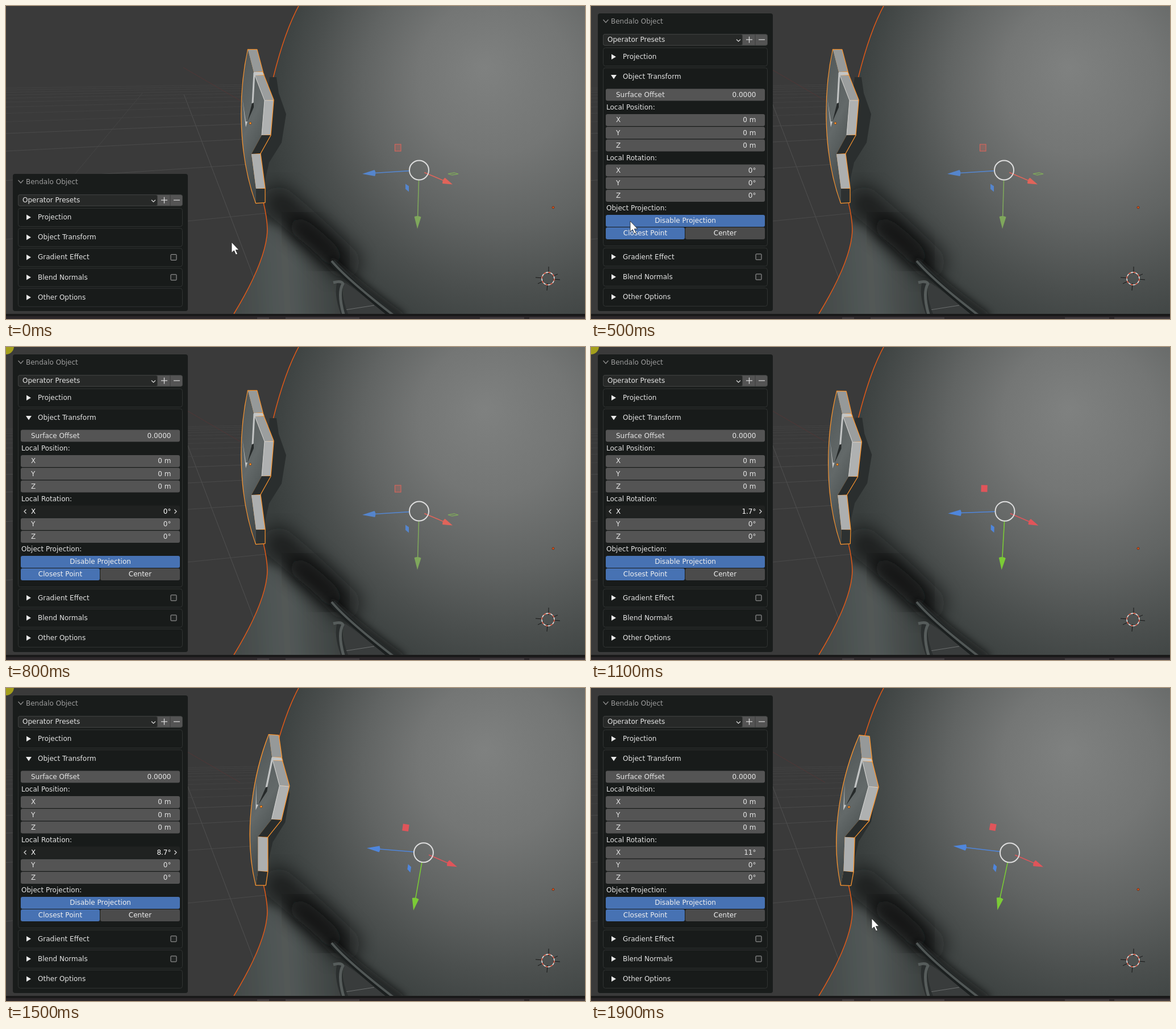
Recreate the animation shown at these times as an HTML page. Size 1019 px wide and 550 px high, loop 2000 ms.

```html
<!DOCTYPE html>
<html>
<head>
<meta charset="utf-8">
<style>
html, body { margin: 0; width: 100%; height: 100%; overflow: hidden; background: #1b1b1b; }
svg { display: block; font: 12px "DejaVu Sans", sans-serif; }
text { white-space: pre; }
</style>
</head>
<body>
<svg width="1019" height="550" viewBox="0 0 1019 550">
  <defs>
    <radialGradient id="skin" gradientUnits="userSpaceOnUse" cx="905" cy="165" r="450" fx="840" fy="108">
      <stop offset="0" stop-color="#7f8180"/>
      <stop offset=".3" stop-color="#747675"/>
      <stop offset=".55" stop-color="#616463"/>
      <stop offset=".78" stop-color="#4b4f4e"/>
      <stop offset=".92" stop-color="#3f4443"/>
      <stop offset="1" stop-color="#393e3d"/>
    </radialGradient>
    <linearGradient id="neck" gradientUnits="userSpaceOnUse" x1="410" y1="500" x2="600" y2="490">
      <stop offset="0" stop-color="#454b4a"/>
      <stop offset=".45" stop-color="#535958"/>
      <stop offset="1" stop-color="#393e3d"/>
    </linearGradient>
    <linearGradient id="front" x2=".3" y2="1">
      <stop offset="0" stop-color="#515757"/>
      <stop offset=".55" stop-color="#636969"/>
      <stop offset="1" stop-color="#434949"/>
    </linearGradient>
    <filter id="soft" x="-50%" y="-50%" width="200%" height="200%"><feGaussianBlur stdDeviation="16"/></filter>
    <filter id="haze" x="-50%" y="-50%" width="200%" height="200%"><feGaussianBlur stdDeviation="7"/></filter>
    <clipPath id="view"><path d="M0 0H1019V541H0Z"/></clipPath>
    <clipPath id="body"><path d="M515 0C492 42 476 100 465 148C445 220 445 290 453 345C459 370 461 392 459 405C454 446 429 495 401 541H1019V0Z"/></clipPath>
  </defs>
  <g clip-path="url(#view)">
    <path fill="#3a3a3a" d="M0 0H1019V541H0Z"/>
    <g id="grid"></g>
    <path d="M312 108L412 166" stroke="#5a3535" opacity=".7"/>
    <g clip-path="url(#body)">
      <path fill="url(#skin)" d="M390 0H1019V541H390Z"/>
      <path fill="url(#neck)" filter="url(#haze)" d="M430 375L480 385L560 448L592 485V570H370Z"/>
      <g fill="none" stroke="#0a0d0d" stroke-linecap="round">
        <path filter="url(#soft)" d="M480 345Q530 385 595 450" stroke-width="56" opacity=".62"/>
        <path filter="url(#soft)" d="M515 388Q545 408 575 440" stroke-width="34" opacity=".85"/>
        <path filter="url(#haze)" d="M575 448Q620 490 695 545" stroke-width="14" opacity=".7"/>
      </g>
      <path fill="#393c3c" d="M596 486Q622 502 668 541H601Q590 515 596 486Z"/>
      <path stroke="#6c6f6f" d="M597 534L648 526"/>
      <g fill="none">
        <path stroke="#2b2f2f" stroke-width="12" d="M588 488Q583 510 597 545"/>
        <path stroke="#565c5b" stroke-width="5" d="M576 486Q590 482 593 488Q583 505 595 545"/>
        <path stroke="#1b1f1f" stroke-width="9" d="M573 449Q598 480 680 545"/>
        <path stroke="#515756" stroke-width="4" d="M573 448Q602 482 684 545"/>
        <path stroke="#252929" stroke-width="3" d="M577 447Q615 485 692 545"/>
      </g>
    </g>
    <path fill="none" stroke="#e25a18" stroke-width="1.5" d="M515 0C492 42 476 100 465 148M453 345C459 370 461 392 459 405C454 446 429 495 401 541"/>
    <circle cx="963" cy="354" r="2" fill="#e0541c" stroke="#502510" stroke-width=".7"/>
    <g fill="none">
      <path stroke="#161616" d="M955 458V471M953 487L952 500M932 477L945 478M963 480L975 481M936 488L946 483M962 475L971 471"/>
      <circle cx="954" cy="479" r="11" stroke="#e8e8e8" stroke-width="1.4"/>
      <circle cx="954" cy="479" r="11" stroke="#d8452c" stroke-width="1.4" stroke-dasharray="4.32"/>
    </g>
    <path id="shadow" fill="#2a2e2e" d="M464 125L476 125L480 153L493 190L485 240L463 275L455 310H440Z"/>
    <g id="badge"></g>
    <g id="gizmo"></g>
  </g>
  <path fill="#191919" d="M0 541H1019V550H0Z"/>
  <path fill="#2c272a" d="M0 545H1019V550H0Z"/>
  <path fill="#423d40" d="M442 547H463V550H442ZM492 547H622V550H492ZM834 547H912V550H834ZM921 547H1019V550H921Z"/>
  <g id="ui"></g>
</svg>
<script>
const el = id => document.getElementById(id);
const STEP = 100, STEPS = 20, DRAG_FROM = 7, DRAG_TO = 16, FULL_TURN = 11;
const ease = t => { t = Math.min(1, Math.max(0, t)); return t * t * (3 - 2 * t); };

const text = (x, mid, s, fill = '#e4e4e4', anchor = 'start') =>
  `<text x="${x}" y="${Math.round(mid + 3.9)}" fill="${fill}" text-anchor="${anchor}">${s}</text>`;
const rect = (x, y, w, h, fill, stroke = 'none', r = 3) =>
  `<rect x="${x}" y="${y}" width="${w}" height="${h}" rx="${r}" fill="${fill}" stroke="${stroke}"/>`;
const fillPath = (d, fill) => `<path d="${d}" fill="${fill}"/>`;
const line = (d, stroke = '#d8d8d8', w = 1.3) =>
  `<path d="${d}" fill="none" stroke="${stroke}" stroke-width="${w}"/>`;

// Floor grid in perspective
function floorGrid() {
  let out = line('M313 155L437 480', '#505050', 1) + line('M240 153L120 297', '#444', 1);
  for (let k = 2; k < 15; k++) {
    const y = 100 + 620 / k;
    out += line(`M0 ${y}L470 ${y - (y - 100) * .152}`, k < 6 ? '#4a4a4a' : '#424242', 1);
  }
  return out;
}

// Curved front with its right edge extruded sideways
function badgeShape() {
  const edge = [[426, 77], [436, 116], [438, 122], [455, 166], [450, 227], [432, 260], [440, 321], [440, 346]];
  const tones = ['#969999', '#c3c5c5', '#9b9e9e', '#afb1b1', '#282c2c', '#adafaf', '#2d3131'];
  const front = `M426 77C412 140 405 250 440 346L${edge.slice().reverse().join(' ')}Z`;
  const sides = tones.map((tone, i) => {
    const [x0, y0] = edge[i], [x1, y1] = edge[i + 1];
    return fillPath(`M${x0} ${y0}h15.5L${x1 + 15.5} ${y1 - 1}L${x1} ${y1}Z`, tone);
  }).join('');
  return `<g stroke="#fb952f" stroke-width="2.4" stroke-linejoin="round">${fillPath(front, 'none') + sides}</g>` +
    fillPath(front, 'url(#front)') + sides +
    line(`M${edge.slice(2, 5).join('L')}M455 166h15`, '#cfd1d1', 1) +
    line('M437 117L434 171', '#c3c5c5', 3) +
    fillPath('M433 171L436 170V178L425 203Z', '#262a2a') +
    fillPath('M416 162L422 203H425L422 213Z', '#c3c5c5') +
    '<circle cx="430" cy="206" r="2" fill="#ff9430" stroke="#5a3210" stroke-width=".7"/>';
}

function arrow(color, dx, dy, start, head, half) {
  const length = Math.hypot(dx, dy), neck = length - head;
  return `<g transform="rotate(${Math.atan2(dy, dx) * 180 / Math.PI})">` +
    line(`M${start} 0H${neck}`, color, 1.6) +
    fillPath(`M${length} 0L${neck} ${-half}Q${neck - 3} 0 ${neck} ${half}Z`, color) + '</g>';
}

function gizmo(u) {
  const moved = u > 0;
  const red = moved ? '#e0555a' : '#e0645a';
  const green = moved ? '#7bcb36' : '#7fa75c';
  const blue = moved ? '#4f86dc' : '#5585cc';
  return `<g transform="translate(${727 + 10 * u} ${288.5 + u})">
    <g transform="rotate(${10.5 * u})">` +
    arrow(blue, -100, 6.5, 17, 22, 5.5) + arrow(green, -3, 103, 17, 21, 6) +
    (moved ? rect(-43, -45, 11, 12, red, 'none', 0) : rect(-42.5, -45.5, 10.5, 12, red + '40', red, 0)) +
    fillPath('M-24 24L-18 28V38L-24 33Z', blue) + '</g>' +
    arrow(red, 59, 25, 10, 17, 5.5) +
    (moved ? '' : line('M51 6.500L62 4.500L69 6.500L58 8.500Z', green)) +
    '<circle r="17" fill="none" stroke="#dedede" stroke-width="2"/></g>';
}

function section(y, h, label, { open, check, bright } = {}) {
  const mid = y + 16.2;
  const mark = open ? `M35 ${mid - 3.5}h10l-5 7.5z` : `M36 ${mid - 4.8}v9.6l8 -4.8z`;
  return rect(21.5, y + .5, 289, h - 1, '#181b1a', '#303332', 4) +
    fillPath(mark, '#e8e8e8') + text(56, mid, label, bright ? '#fff' : undefined) +
    (check ? rect(290, mid - 5, 10, 10, '#202322', '#a5a5a5', 1) : '');
}

function field(y, label, value, active) {
  const mid = y + 10.5, ink = active ? '#fff' : undefined;
  return rect(26, y, 280, 21, active ? '#202221' : '#545454') +
    text(44, mid, label, ink) + text(290.5, mid, value, ink, 'end') +
    (active ? line(`M35.5 ${mid - 3.5}l-3.5 3.5l3.5 3.5M296.5 ${mid - 3.5}l3.5 3.5l-3.5 3.5`) : '');
}

function transformFields(angle, hover) {
  const button = (x, y, w, label, fill) =>
    rect(x, y, w, 21, fill) + text(x + w / 2, y + 10.5, label, '#f0f0f0', 'middle');
  const axes = (y, first, rest, active) =>
    ['X', 'Y', 'Z'].map((axis, i) => field(y + 22.2 * i, axis, i ? rest : first, active && !i)).join('');
  return field(145.5, 'Surface Offset', '0.0000') +
    text(27, 178, 'Local Position:') + axes(190, '0 m', '0 m') +
    text(27, 267, 'Local Rotation:') + axes(278.5, angle + '°', '0°', hover) +
    text(27, 355.5, 'Object Projection:') +
    button(26, 367, 280, 'Disable Projection', '#4772b3') +
    button(26, 389, 139, 'Closest Point', '#4772b3') +
    button(166, 389, 140, 'Center', '#4b4b4b');
}

function panel(step, angle) {
  const open = step >= 5, top = open ? 13 : 295;
  const mid = top + 46.2, pitch = 35.2, low = open ? 424.6 : 425.4;
  return rect(12, top, 308, 536 - top, '#191c1b', 'none', 4) +
    line(`M21.5 ${top + 11}l4.5 5l4.5 -5`, '#8e8e8e') + text(35, top + 13.7, 'Bendalo Object', '#9c9c9c') +
    rect(21.5, mid - 9.5, 289, 19.5, '#545454', '#3e403f') +
    rect(21.5, mid - 9.5, 245, 19.5, '#272928', '#3e403f') +
    text(29, mid, 'Operator Presets') +
    line(`M256 ${mid - .5}l3.5 3.5l3.5 -3.5M273 ${mid}h11m-5.5 -5.5v11M295 ${mid}h11`) +
    line(`M289 ${mid - 9}v19`, '#3a3a3a', 1) +
    section(top + 60, 33, 'Projection') +
    section(top + 60 + pitch, open ? 314 : 33, 'Object Transform', { open, bright: step === 4 }) +
    (open ? transformFields(angle, step >= 6 && step <= 17) : '') +
    section(low, 33, 'Gradient Effect', { check: true }) +
    section(low + pitch, 33, 'Blend Normals', { check: true }) +
    section(low + 2 * pitch, 33, 'Other Options');
}

function pointer(step) {
  const glide = ease(step / 4), climb = Math.max(0, step - 4), out = step - 18;
  const [x, y] = step < DRAG_FROM
    ? [397 - 364 * glide + 36 * climb, 415 - 8 * glide - 29 * climb * climb]
    : [324 + 170 * out, 357 + 48 * out];
  return `<path transform="translate(${x} ${y})" d="M0 0V18.5L4.3 14.8L7.5 22L10.5 20.7L7.3 13.7H13Z" fill="#fff" stroke="#222" stroke-width=".8"/>`;
}

function draw(step) {
  const u = ease((step - 8.87) / 8.68);
  const angle = +(FULL_TURN * u).toFixed(1);
  const pressed = step >= DRAG_FROM && step <= DRAG_TO;
  el('shadow').setAttribute('transform', `translate(${8 * u} ${-5 * u})`);
  // Lean about the lower tip
  el('badge').setAttribute('transform', `translate(440 346) matrix(${1 + .09 * u} ${.11 * u} ${-.178 * u} ${1 - .03 * u} 0 0) translate(-440 -346)`);
  el('gizmo').innerHTML = gizmo(u);
  el('ui').innerHTML = panel(step, angle) +
    (pressed ? '<circle cx="0" cy="-1" r="14" fill="#a5a01c"/>' : pointer(step));
}

el('grid').innerHTML = floorGrid();
el('badge').innerHTML = badgeShape();

let shown = -1;
function tick(now) {
  const step = Math.floor(now / STEP) % STEPS;
  if (step !== shown) draw(shown = step);
  requestAnimationFrame(tick);
}
draw(0);
requestAnimationFrame(tick);
</script>
</body>
</html>
```
